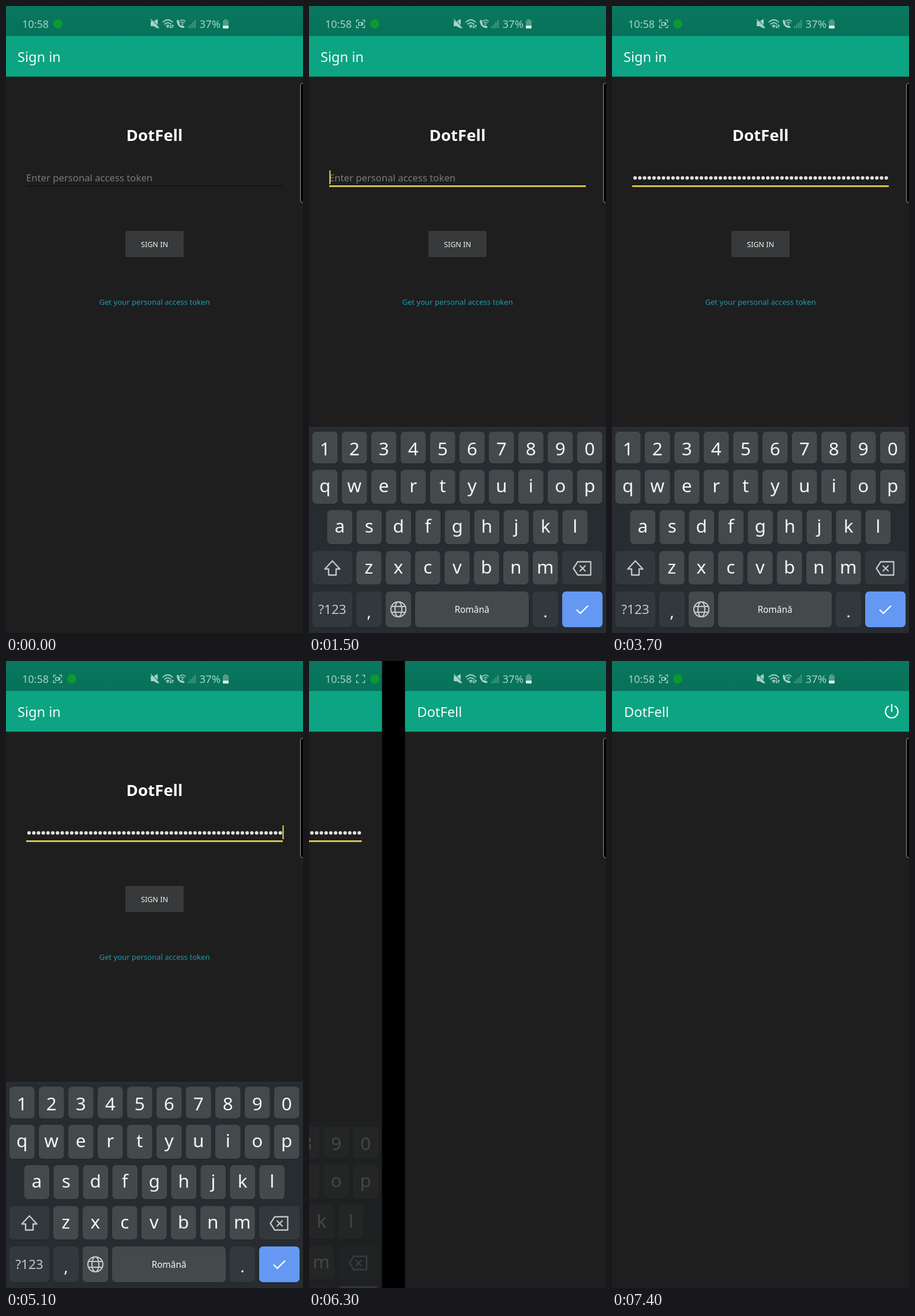
Recreate the animation shown at these times as an HTML page. Size 515x1087 px, loop 8 s.

```html
<!DOCTYPE html>
<html lang="en">
<head>
<meta charset="utf-8">
<title>Sign in</title>
<style>
  html, body { margin: 0; width: 100%; height: 100%; overflow: hidden; background: #000; }
  svg { display: block; width: 100vw; height: 100vh; }
  text { font-family: "Noto Sans", "Open Sans", sans-serif; fill: #fff; }
  .mid { text-anchor: middle; }
  .line { fill: none; stroke-linecap: round; stroke-linejoin: round; }
</style>
</head>
<body>
<svg id="stage" viewBox="0 0 515 1087"></svg>
<script>
const LOOP = 8000;
const APP = 'DotFell';
const TINT = '#a5d3c5';

const rect = (x, y, w, h, fill, r = 0, extra = '') =>
  `<rect x="${x}" y="${y}" width="${w}" height="${h}" rx="${r}" fill="${fill}" ${extra}/>`;
const text = (x, y, size, label, extra = '') =>
  `<text x="${x}" y="${y}" font-size="${size}" ${extra}>${label}</text>`;
const line = (d, color, width, extra = '') =>
  `<path class="line" d="${d}" stroke="${color}" stroke-width="${width}" ${extra}/>`;
const group = (id, body) => `<g id="${id}">${body}</g>`;

function pageBase(title, x) {
  return rect(0, 0, 515, 1087, '#1e1e1e') +
    rect(0, 0, 515, 52, 'url(#bar)') +
    rect(0, 52, 515, 70.5, '#0ca483') +
    text(x, 97, 23.6, title, 'fill-opacity=".96"');
}

function key(x, y, w, h, label, opt = {}) {
  const { size = 31.5, base = 39, fill = '#444a4b', color = '#f4f6f6' } = opt;
  return rect(x, y + 1, w, h, '#1f2428', 6.5) + rect(x, y, w, h, fill, 6.5) +
    (label ? text(x + w / 2, y + base, size, label, `class="mid" style="fill:${color}"`) : '');
}

function keyboard() {
  const rows = [
    ['1234567890', 6, 738, 55, 41],
    ['qwertyuiop', 6, 804, 59, 39],
    ['asdfghjkl', 31.5, 874, 59, 39],
    ['zxcvbnm', 82, 945, 58, 39]
  ];
  const dark = '#33383c', soft = '#c3c7c9';
  let out = rect(0, 730, 515, 357, '#272c31') + rect(0, 730, 515, 1.5, '#2d363c');
  for (const [chars, x, y, h, base] of rows)
    [...chars].forEach((c, i) => out += key(x + i * 51, y, 43.5, h, c, { base }));
  out += key(6, 945, 69, 58, '', { fill: dark }) +
    key(439, 945, 70, 58, '', { fill: dark }) +
    key(6, 1015, 69, 62, '?123', { fill: dark, size: 22.5, color: soft }) +
    key(82, 1015, 44, 62, ',', { fill: dark, size: 28, base: 45 }) +
    key(133, 1015, 44, 62, '') +
    key(184, 1015, 197, 62, 'Română', { size: 15.4, base: 37 }) +
    key(388, 1015, 44, 62, '.', { fill: dark, size: 28, base: 45 }) +
    key(439, 1015, 70, 62, '', { fill: '#6498f2' });
  out += line('M40.5 962L27.5 976H34V986.5H47V976H53.5Z', soft, 2.4);
  out += line('M466 963.5H488.5V986.5H466L458.5 975Z', soft, 2.3) +
    line('M470 970.5L479 979.5M479 970.5L470 979.5', soft, 2.3);
  out += line('M142 1046a13 13 0 1 0 26 0a13 13 0 1 0 -26 0M149 1046a6 13 0 1 0 12 0a6 13 0 1 0 -12 0' +
    'M143.5 1041H166.5M143.5 1051H166.5', '#c9cdce', 2);
  out += line('M464 1046.5L470.5 1053L484 1039.5', '#fff', 2.4, 'style="stroke-linecap:butt"');
  return out;
}

function signInPage() {
  let dots = '';
  for (let i = 0; i < 54; i++) dots += `<circle cx="${40 + i * 8.22}" cy="298" r="3.1" fill="#dedede"/>`;
  return pageBase('Sign in', 20) +
    text(257.5, 234, 27.6, APP, 'class="mid" font-weight="600"') +
    group('hint', text(35, 304, 16.7, 'Enter personal access token', 'style="fill:#7a7a7a"')) +
    group('dots', dots) +
    rect(35, 311, 445, 1.5, '#0f0f0f') +
    group('focus', rect(35, 311, 445, 2.7, '#edd54e')) +
    `<rect id="cursor" y="285" width="2" height="24" fill="#f2da50"/>` +
    rect(207, 391, 101, 45.5, '#191919', 2) +
    rect(207, 390, 101, 45.5, '#38393a', 2) +
    text(257.5, 418, 12.6, 'SIGN IN', 'class="mid" fill-opacity=".95"') +
    text(257.5, 518, 13.1, 'Get your personal access token', 'class="mid" style="fill:#1f9bb0"') +
    group('keys', keyboard());
}

function homePage() {
  return pageBase(APP, 21) +
    group('power', line('M479.3 78.6A10.8 10.8 0 1 0 490.7 78.6M485 75.5V87', '#f4fbf9', 2.4));
}

function statusBar() {
  let bars = '';
  for (let i = 0; i < 4; i++) bars += rect(316 + i * 3.6, 35 - i * 3.6, 2, 3.5 + i * 3.6, '#4d9d87');
  return text(28, 38, 18, '10:58', `style="fill:${TINT}"`) +
    group('capture',
      line('M82.5 28V24.5H86M93 24.5H96.5V28M96.5 34V37.5H93M86 37.5H82.5V34', TINT, 1.5) +
      group('camera', line('M86 28.5H91.5V33.5H86ZM91.5 31L93.5 29V33Z', TINT, 1.4))) +
    '<circle id="badge" cy="31" r="8" fill="#0b9a30"/>' +
    `<path d="M251 26.5H256L263 22.5V39L256 35H251Z" fill="${TINT}"/>` +
    line('M252.5 23L266 37.5', '#08745b', 1.6) + line('M251.5 23.5L265 38', TINT, 1.6) +
    line('M272 28Q280.5 20 289 28M275 31.5Q280.5 26.5 286 31.5M278 34.5Q280.5 32.5 283 34.5', TINT, 1.7) +
    `<circle cx="280.5" cy="36.5" r="1.6" fill="${TINT}"/>` +
    line('M285.5 33V38M284 36.5L285.5 38L287 36.5M289 38V33M287.5 34.5L289 33L290.5 34.5', TINT, 1.1) +
    line('M298 25.5C297 31 302 37 308 36.5M297.5 26L299.5 29M305 35L308 36.5', TINT, 3) +
    line('M301 26.5Q306 22 311 26.5M303.2 29.3Q306 26.6 308.8 29.3', TINT, 1.5) +
    `<circle cx="306" cy="31.5" r="1.3" fill="${TINT}"/>` +
    bars + text(335.5, 38, 18.5, '37%', `style="fill:${TINT}"`) +
    rect(376, 25, 10, 14, '#4d9d87', 1) + rect(378.5, 23, 5, 3, '#4d9d87') +
    rect(376, 34, 10, 5, '#d4eee6', 1);
}

document.getElementById('stage').innerHTML =
  `<defs><linearGradient id="bar" x1="0" y1="0" x2="0" y2="1">
    <stop offset="0" stop-color="#087860"/><stop offset="1" stop-color="#08715a"/>
  </linearGradient></defs>` +
  rect(0, 0, 515, 1087, '#000') +
  group('signIn', signInPage()) + group('home', homePage()) + statusBar() +
  rect(510.5, 134, 14, 207, '#000', 4, 'stroke="#9a9a9a" stroke-width="1"');

const parts = {};
document.querySelectorAll('[id]').forEach(n => parts[n.id] = n);

const ramp = (t, from, to) => Math.min(1, Math.max(0, (t - from) / (to - from)));
const smooth = p => p * p * (3 - 2 * p);
const show = (name, on) => parts[name].setAttribute('opacity', +on);
const move = (name, x, y = 0) => parts[name].setAttribute('transform', `translate(${x} ${y})`);

// cubic-bezier(.4, 0, .2, 1)
function glide(x) {
  let lo = 0, hi = 1, s = .5;
  for (let i = 0; i < 24; i++) {
    s = (lo + hi) / 2;
    const at = 3 * (1 - s) ** 2 * s * .4 + 3 * (1 - s) * s * s * .2 + s ** 3;
    if (at < x) lo = s; else hi = s;
  }
  return 3 * (1 - s) * s * s + s ** 3;
}

const FOCUS = 500, PASTE = 3100;
const CURSOR_ON = [[500, 1000], [1500, 2100], [2600, 3500], [4100, 4600], [5100, 5600]];

function render(t) {
  const shift = -555 * glide(ramp(t, 6059, 6600));
  move('signIn', shift);
  move('home', 555 + shift);
  show('power', ramp(t, 6750, 6950));

  // The keyboard fades in faster than it rises, and leaves with both together.
  const closing = 1 - smooth(ramp(t, 6130, 6365));
  move('keys', 0, 84 * (1 - smooth(ramp(t, 500, 900)) * closing));
  show('keys', smooth(ramp(t, 500, 805)) * closing);

  const pasted = t >= PASTE;
  show('hint', !pasted);
  show('dots', pasted);
  show('focus', t >= FOCUS);
  show('cursor', CURSOR_ON.some(([a, b]) => t >= a && t < b));
  parts.cursor.setAttribute('x', pasted ? 479.5 : 35.3);

  const arrive = smooth(ramp(t, 80, 400));
  parts.badge.setAttribute('cx', 90 + 24 * arrive);
  show('capture', arrive);
  show('camera', (t + 20) % 780 >= 250 || t < 700);
}

const start = performance.now();
function tick() {
  render((performance.now() - start) % LOOP);
  requestAnimationFrame(tick);
}
tick();
</script>
</body>
</html>
```
